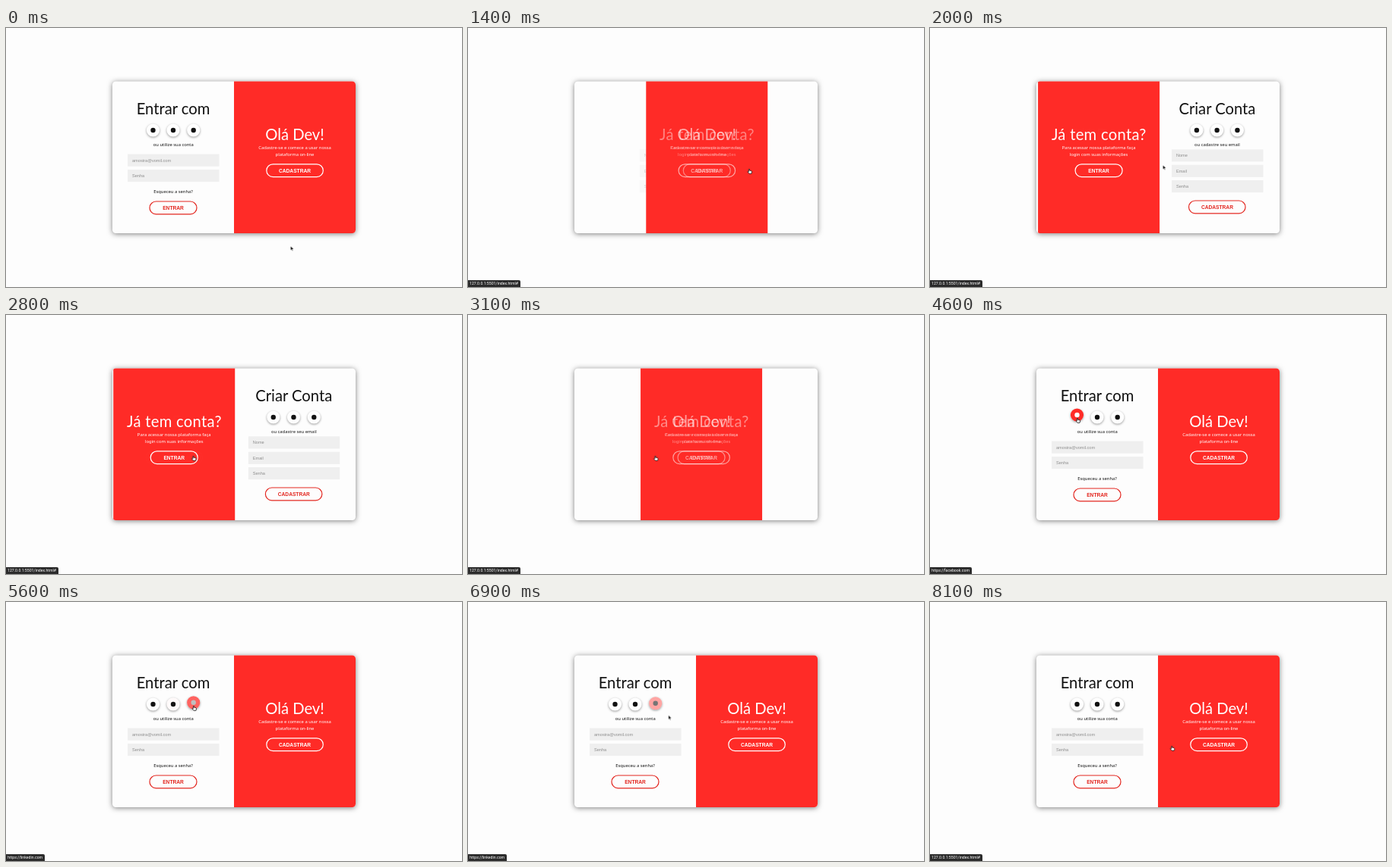
These frames come from a looping animation (600 by 342 pixels, 8200 ms). An HTML page:

```html
<!DOCTYPE html>
<html lang="pt">
<head>
<meta charset="utf-8">
<title>Login</title>
<style>
@property --p { syntax: "<number>"; inherits: true; initial-value: 0; } /* panel slide */
@property --h { syntax: "<number>"; inherits: true; initial-value: 0; } /* icon hover */
@property --k { syntax: "<number>"; inherits: true; initial-value: 0; } /* pointer: 0 arrow, 1 hand, -1 text */
@property --s { syntax: "<number>"; inherits: true; initial-value: 0; } /* status line shown */

html, body { margin: 0; width: 100%; height: 100%; overflow: hidden; background: #fdfdfd; }
svg { position: absolute; left: 0; top: 0; animation: slide 8.2s infinite; }
text { text-anchor: middle; fill: #111; font: 5.84px "Noto Sans", sans-serif; }
.title { font: 20.2px Lato, sans-serif; }
.wide { letter-spacing: .3px; }
.hint { text-anchor: start; fill: #8c8c8c; font: 5.6px "Liberation Sans", Arial, sans-serif; }
.btn { font: bold 6.65px "Liberation Sans", Arial, sans-serif; fill: #e3261f; }
.pill { fill: none; stroke: #e3261f; stroke-width: 1.2; }
.field { fill: #efefef; }
.card { fill: #fdfdfd; filter: drop-shadow(0 1.5px 3.5px rgba(0, 0, 0, .5)); }

.form { transform: translateX(calc(var(--p) * 160px)); }
.in { opacity: calc(1 - 2.5 * var(--p)); }
.up { opacity: var(--p); }
.panel { transform: translateX(calc(var(--p) * -160px)); }
.panel text { fill: #fff; }
.panel .pill { stroke: #fff; }
.hello { opacity: calc(1 - var(--p)); }
.back { opacity: var(--p); }

.icon { transform: translateY(calc(var(--h) * -3px)); }
.disc { fill: #fff; filter: drop-shadow(0 1px 1.4px rgba(0, 0, 0, .4)); }
.glow { opacity: var(--h); }
.h1 { animation: h1 8.2s infinite; }
.h2 { animation: h2 8.2s infinite; }
.h3 { animation: h3 8.2s infinite; }

.pointer { animation: move 8.2s ease-in-out infinite, shape 8.2s step-end infinite; }
.arrow { opacity: calc(1 - var(--k) * var(--k)); }
.hand { opacity: var(--k); }
.beam { opacity: calc(0 - var(--k)); }

.status { animation: status 8.2s step-end infinite; }
.status div {
  position: absolute; left: 0; bottom: 0; height: 9px; padding: 0 3px 0 2px;
  border-radius: 0 2px 0 0; background: #2b2b2b; color: #fff; white-space: nowrap;
  font: 5.2px/9px Roboto, sans-serif;
  opacity: calc(1 - max(var(--n) - var(--s), var(--s) - var(--n)));
}

@keyframes slide {
  0%, 14.024% { --p: 0; animation-timing-function: ease; }
  26.22%, 33.963% { --p: 1; animation-timing-function: ease; }
  46.159%, 100% { --p: 0; }
}
@keyframes h1 {
  0%, 50% { --h: 0; }
  53.66%, 57.927% { --h: 1; }
  61.585%, 100% { --h: 0; }
}
@keyframes h2 {
  0%, 59.146% { --h: 0; }
  62.8%, 65.244% { --h: 1; }
  68.9%, 100% { --h: 0; }
}
@keyframes h3 {
  0%, 66.707% { --h: 0; }
  70.366%, 82.927% { --h: 1; }
  86.585%, 100% { --h: 0; }
}
@keyframes move {
  0%, 2.44% { transform: translate(374.5px, 288px); }
  10.976%, 18.293% { transform: translate(370px, 186px); }
  24.39% { transform: translate(306.5px, 181px); }
  31.707%, 38.415% { transform: translate(246.5px, 186px); }
  45.122% { transform: translate(199px, 153px); }
  50.61%, 57.317% { transform: translate(194px, 136px); }
  59.756%, 65.244% { transform: translate(220px, 137px); }
  67.073%, 82.317% { transform: translate(247px, 137px); }
  87.805%, 100% { transform: translate(318.2px, 190px); }
}
@keyframes shape {
  0% { --k: 0; }
  9.146% { --k: 1; }
  18.5% { --k: 0; }
  30.5% { --k: 1; }
  39% { --k: 0; }
  44.5% { --k: -1; }
  48.8% { --k: 1; }
  83.5% { --k: 0; }
  87.2%, 100% { --k: 1; }
}
@keyframes status {
  0% { --s: 0; }
  9.756% { --s: 1; }
  49.39% { --s: 2; }
  59.146% { --s: 3; }
  66.83% { --s: 4; }
  86.585%, 100% { --s: 1; }
}
</style>
</head>
<body>
<svg width="600" height="342" viewBox="0 0 600 342">
  <defs>
    <clipPath id="round"><rect x="140" y="70.5" width="320" height="200.5" rx="4.5"/></clipPath>
    <g id="icon">
      <g class="icon">
        <circle class="disc" r="8.6"/>
        <circle r="3.2" fill="#111"/>
        <g class="glow">
          <circle r="8.6" fill="#ff2b27"/>
          <circle r="3.2" fill="#fff"/>
        </g>
      </g>
    </g>
    <rect id="field" class="field" x="160" width="120.5" height="16.2"/>
  </defs>

  <rect class="card" x="140" y="70.5" width="320" height="200.5" rx="4.5"/>

  <g clip-path="url(#round)">
    <g class="form"><g class="in">
      <text class="title" x="220" y="114.3">Entrar com</text>
      <use class="h1" href="#icon" x="193.5" y="135"/>
      <use class="h2" href="#icon" x="220" y="135"/>
      <use class="h3" href="#icon" x="246.7" y="135"/>
      <text x="220.3" y="156.2">ou utilize sua conta</text>
      <use href="#field" y="166.5"/>
      <text class="hint" x="166" y="176.5">amostra@vomil.com</text>
      <use href="#field" y="187"/>
      <text class="hint" x="166" y="197">Senha</text>
      <text x="220" y="218.2">Esqueceu a senha?</text>
      <rect class="pill" x="189" y="229" width="62" height="16.8" rx="8.4"/>
      <text class="btn" x="220" y="239.8">ENTRAR</text>
    </g></g>

    <g class="form"><g class="up">
      <text class="title" x="220" y="114.3">Criar Conta</text>
      <use href="#icon" x="193" y="135"/>
      <use href="#icon" x="219.7" y="135"/>
      <use href="#icon" x="246.5" y="135"/>
      <text x="220" y="156.2">ou cadastre seu email</text>
      <use href="#field" y="160.3"/>
      <text class="hint" x="166" y="170.4">Nome</text>
      <use href="#field" y="180.7"/>
      <text class="hint" x="166" y="190.7">Email</text>
      <use href="#field" y="201"/>
      <text class="hint" x="166" y="211">Senha</text>
      <rect class="pill" x="182.6" y="228" width="74.5" height="16.8" rx="8.4"/>
      <text class="btn" x="220" y="238.9">CADASTRAR</text>
    </g></g>

    <g class="panel">
      <rect x="300" y="70" width="160" height="202" fill="#ff2b27"/>
      <g class="back">
        <text class="title wide" x="380.2" y="148">Já tem conta?</text>
        <text x="380" y="160.2">Para acessar nossa plataforma faça</text>
        <text x="380" y="169">login com suas informações</text>
        <rect class="pill" x="349" y="179.8" width="62" height="16.8" rx="8.4"/>
        <text class="btn" x="380" y="190.6">ENTRAR</text>
      </g>
      <g class="hello">
        <text class="title" x="380" y="148">Olá Dev!</text>
        <text x="380" y="160.2">Cadastre-se e comece a usar nossa</text>
        <text x="380" y="169">plataforma on-line</text>
        <rect class="pill" x="342.8" y="179.8" width="74.5" height="16.8" rx="8.4"/>
        <text class="btn" x="380" y="190.6">CADASTRAR</text>
      </g>
    </g>
  </g>

  <g class="pointer" stroke-linejoin="round">
    <path class="arrow" d="M0 0V5.6L1.3 4.4L2.2 6.5L3.1 6.1L2.2 4.1H4Z" fill="#000" stroke="#fff" stroke-width=".5"/>
    <path class="hand" d="M-.6 .4Q0-.4 .6 .4V2.2L2.9 2.7Q3.6 3 3.5 4L3 6.3H0L-2.1 3.8Q-1.8 2.8-.6 3.7Z" fill="#fff" stroke="#000" stroke-width=".7"/>
    <path class="beam" d="M-1.2-3Q0-3 0-2.2Q0-3 1.2-3M0-2.2V2.2M-1.2 3Q0 3 0 2.2Q0 3 1.2 3" fill="none" stroke="#222" stroke-width=".7"/>
  </g>
</svg>

<div class="status">
  <div style="--n:1">127.0.0.1:5501/index.html#</div>
  <div style="--n:2">https://facebook.com</div>
  <div style="--n:3">https://google.com</div>
  <div style="--n:4">https://linkedin.com</div>
</div>
</body>
</html>
```
